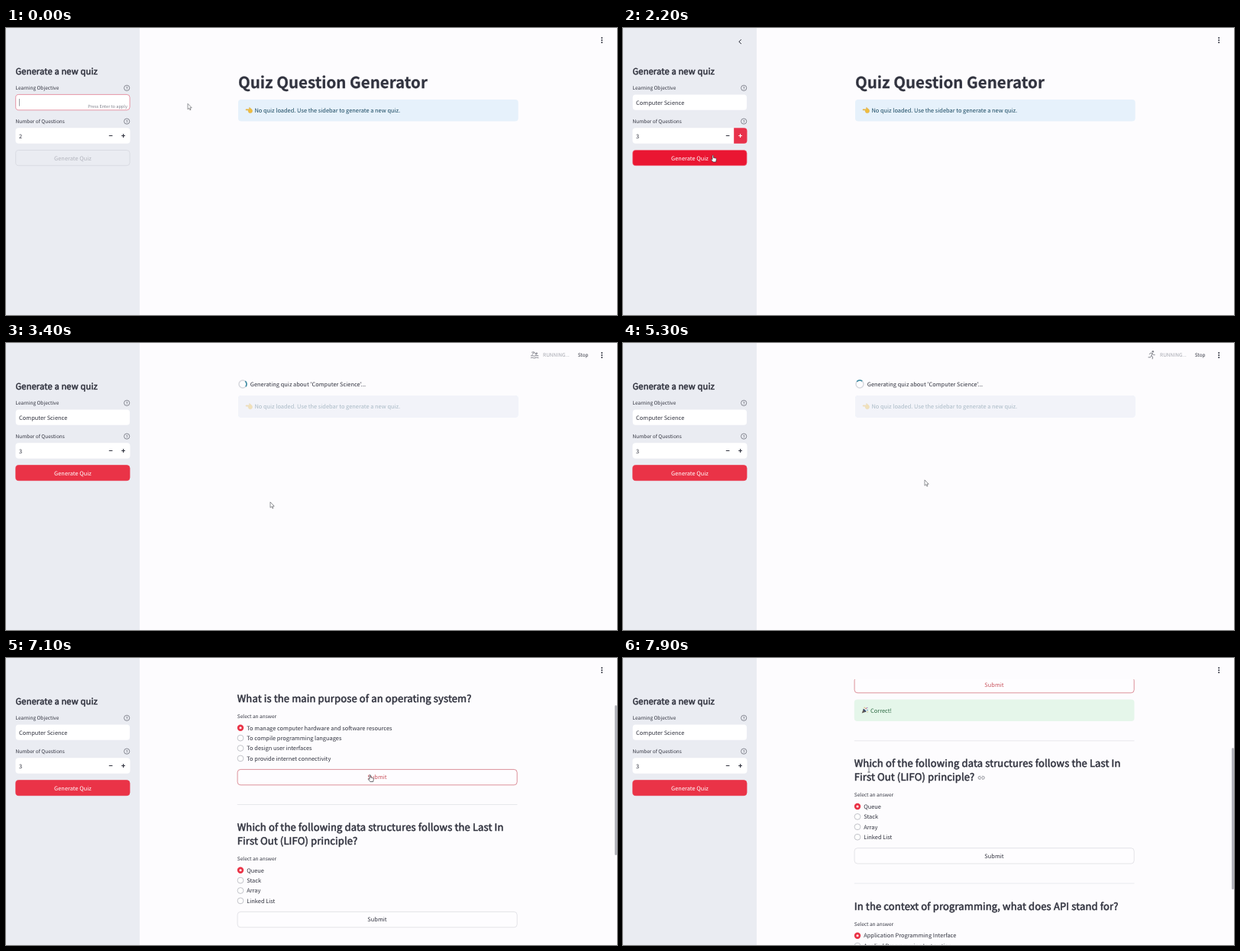
An HTML page that plays this animation: 800x377 px, repeating every 8 s.

```html
<!DOCTYPE html>
<html lang="en">
<head>
<meta charset="utf-8">
<title>Quiz generator</title>
<style>
  html, body { margin: 0; width: 100%; height: 100%; overflow: hidden; background: #fdfcfe; }
  svg { display: block; width: 100vw; height: 100vh; }
  text {
    font-family: "Noto Sans CJK JP", "Noto Sans CJK SC", "Noto Sans CJK", "Noto Sans", sans-serif;
    fill: #31333f; text-rendering: geometricPrecision; white-space: pre;
  }
  .semi { stroke: #31333f; stroke-width: .52px; letter-spacing: .13px; }
  .title { font-weight: 700; stroke: #31333f; stroke-width: .25px; }
  .strong { stroke: #2f6b45; stroke-width: .25px; }
  .line { fill: none; stroke: #31333f; stroke-linecap: round; stroke-linejoin: round; }
  #status .line, #link { stroke: #85878f; }
</style>
</head>
<body>
<script>
const LOOP = 8000, STEP = 100;
const BODY = 7.45, SMALL = 6.52, TINY = 5.59, H2 = 11.17, H3 = 13.03, H1 = 20.5;
const RED = '#ea3347', HOT = '#ea1632', INK = '#31333f', GREEN = '#2f6b45', GREY = '#85878f';
const LEFT = 302.8, WIDTH = 366.7;
const topic = 'Computer Science';

// Markup helpers
const text = (x, y, s, size = BODY, attrs = '') =>
  `<text x="${x}" y="${y}" font-size="${size}" ${attrs}>${s}</text>`;
const box = (x, y, w, h, fill, attrs = '') =>
  `<rect x="${x}" y="${y}" width="${w}" height="${h}" rx="4" fill="${fill}" ${attrs}/>`;
const line = (d, width = 1, attrs = '') =>
  `<path class="line" d="${d}" stroke-width="${width}" ${attrs}/>`;
const dot = (x, y, r, fill, attrs = '') =>
  `<circle cx="${x}" cy="${y}" r="${r}" fill="${fill}" ${attrs}/>`;
const ring = (x, y, r, colour, width) =>
  dot(x, y, r, 'none', `stroke="${colour}" stroke-width="${width}"`);
const group = (id, body) => `<g id="${id}">${body}</g>`;
const rule = y => `<rect x="${LEFT}" y="${y - .3}" width="${WIDTH}" height=".7" fill="#dfe0e6"/>`;
const help = y => ring(158.2, y, 3.6, '#6d6f7a', .8) +
  text(158.2, y + 1.9, '?', 5.2, 'text-anchor="middle"');

const popper = (x, y) => `<g transform="translate(${x} ${y})">
  <path d="M-3.8 3.8L-1.6-2L2 1.6Z" fill="#5f5a55"/>
  <path d="M-1.6-2Q1.2-1 2 1.6L.5 2L-2-.7Z" fill="#3c4a70"/>
  ${dot(1.6, -2.6, .8, '#c8475a')}${dot(3.4, -.4, .7, '#4b76b8')}${dot(-.4, -3.6, .6, '#d2a53c')}
  ${dot(3.3, -3.4, .6, '#8a5bb0')}${dot(3.6, 2, .6, '#d2a53c')}</g>`;

const hand = `<path transform="translate(318.3 108.2)" fill="#f0bd3e" stroke="#c98f22" stroke-width=".3"
  d="M-4.4-1.2Q-4.6-.1-3.6-.1H-.9Q-1.6 1-.9 1.6Q-1 2.5-.2 2.7Q0 3.5 1 3.4H2.5Q4.2 3 4.3.8Q4.3-1.4 2.4-2.2
  L.8-3.7Q0-3.9 0-3L.7-1.5H-3.6Q-4.3-1.6-4.4-1.2Z"/>`;

function submitButton(y, id) {
  return `<g ${id ? `id="${id}"` : ''}>` +
    box(LEFT + .3, y, WIDTH - .6, 20.4, '#fefdff', 'stroke="#d8d9df" stroke-width=".7"') +
    text(486, y + 13, 'Submit', BODY, 'text-anchor="middle"') + '</g>';
}

// One question block, placed below its divider
function question(y, lines, answers, submitId) {
  const low = y + (lines.length - 1) * 17.5;
  const heads = lines.map((s, i) => text(LEFT, y + 34.7 + i * 17.5, s, H3, 'class="semi"'));
  const radios = answers.map((s, i) => {
    const cy = low + 68.7 + i * 13.4;
    const mark = i ? dot(307, cy, 3.9, '#fff', 'stroke="#a9abb3" stroke-width=".7"')
                   : dot(307, cy, 4.2, RED) + dot(307, cy, 1.5, '#fff');
    return mark + text(315.2, cy + 2.8, s);
  });
  return rule(y) + heads.join('') + text(LEFT, low + 56.1, 'Select an answer', SMALL) +
    radios.join('') + submitButton(low + 123.4, submitId);
}

const sidebar = `<rect width="175" height="377" fill="#eaecf2"/>` +
  line('M154.6 15.4L151.8 18L154.6 20.6', 1, 'id="collapse"') +
  text(12.5, 61.4, 'Generate a new quiz', H2, 'class="semi"') +
  text(12.5, 81.3, 'Learning Objective', SMALL) + help(78.8) +
  box(12.7, 87.4, 149.4, 20.4, '#fff', 'id="field"') +
  text(17, 100.6, '', BODY, 'id="typed"') +
  '<rect id="caret" y="93" width=".6" height="9.6" fill="#5a5c66"/>' +
  text(158.8, 105, 'Press Enter to apply', TINY, 'id="hint" text-anchor="end" style="fill:#80828c"') +
  text(12.5, 125.1, 'Number of Questions', SMALL) + help(122.6) +
  box(12.5, 131.2, 150, 20.6, '#fff') + text(17, 144.5, '2', BODY, 'id="count"') +
  '<path id="plusBg" d="M145.2 131.2H158.5Q162.5 131.2 162.5 135.2V147.8Q162.5 151.8 158.5 151.8H145.2Z" fill="#e8314a"/>' +
  line('M135.3 141.5H139', 1.2) + line('M151.7 141.5H155.5M153.6 139.6V143.4', 1.2, 'id="plus"') +
  box(12.7, 160.5, 149.4, 20.2, 'none', 'id="goBg" stroke-width=".6"') +
  text(87.5, 173.5, 'Generate Quiz', BODY, 'id="go" text-anchor="middle"');

const title = text(304, 79.4, 'Quiz Question Generator', H1, 'class="title"');

const intro = group('title', title) + group('notice',
  box(304, 94, 366.7, 28.6, '#e6f1fb') + box(304, 94, 366.7, 28.6, '#f2f3f9', 'id="veil"') +
  group('noticeText', hand + text(325.4, 110.9,
    'No quiz loaded. Use the sidebar to generate a new quiz.', BODY, 'style="fill:#17475f"')));

const spinner = group('spinner',
  ring(310, 54, 5, '#d6d8de', 1.5) +
  '<path id="arc" d="M306.46 50.46A5 5 0 0 1 313.54 50.46" fill="none" stroke="#3c8ba3" stroke-width="1.6"/>' +
  text(319.8, 56.8, `Generating quiz about '${topic}'...`));

const results = group('results', `<g transform="translate(-1.2 0)">${title}</g>` +
  box(LEFT, 94, WIDTH, 28.6, '#e5f6ea') + popper(316.5, 108.3) +
  text(324, 111, `A new quiz was generated based on the learning objective:  <tspan class="strong">${topic}</tspan>`,
    BODY, `style="fill:${GREEN}"`) +
  question(148.5, ['What is the main purpose of an operating system?'],
    ['To manage computer hardware and software resources', 'To compile programming languages',
     'To design user interfaces', 'To provide internet connectivity'], 'submit') +
  group('correct', box(LEFT, 301, WIDTH, 28.6, '#e5f6ea') + popper(316.5, 315.3) +
    text(324, 318, 'Correct!', BODY, `style="fill:${GREEN}"`)) +
  group('rest',
    question(318, ['Which of the following data structures follows the Last In', 'First Out (LIFO) principle?'],
      ['Queue', 'Stack', 'Array', 'Linked List']) +
    question(505.2, ['In the context of programming, what does API stand for?'],
      ['Application Programming Interface', 'Applied Programming Instruction']) +
    line('M468 364.6H467A1.9 1.9 0 0 0 467 368.4H468M470.4 364.6H471.4A1.9 1.9 0 0 1 471.4 368.4H470.4M467.6 366.5H470.8',
      .9, 'id="link"')));

// Sports figures of the running indicator: runner, swimmer, cyclist
const figures = [
  dot(693.8, 11.3, 1.3, GREY) +
    line('M689.2 14.6L691 13L693.2 13.6L691.8 16.6L693.6 18L693.2 20.8M691.8 16.8L690.6 18.8H688M693.2 13.8L694.4 15.6H696.2'),
  dot(694.8, 13.6, 1.2, GREY) +
    line('M688.6 12.2L691.4 11.8L694 15.4M691.4 12.4L689.2 15M687.4 16.8Q688.9 15.8 690.2 16.8T693 16.8T697 16.8M687.4 19.4Q688.9 18.4 690.2 19.4T693 19.4T697 19.4'),
  dot(693.6, 11, 1.2, GREY) + ring(689.4, 18, 2.2, GREY, .9) + ring(695.4, 18, 2.2, GREY, .9) +
    line('M695.4 14.6H693.6L692.4 13L690 14.8L692.4 16.2V18.6')
];
const status = group('status', figures.map((f, i) => group('fig' + i, f)).join('') +
  text(703, 18.2, 'RUNNING...', SMALL, 'style="fill:#a4a6ae"') + text(748.7, 18.2, 'Stop', 6.4));

const pointers = group('arrow',
    '<path d="M0 .4V7.8L1.7 6.3L2.9 8.8L4 8.3L2.9 5.8H5.2Z" fill="#fff" stroke="#4c4d55" stroke-width=".6"/>') +
  group('finger',
    '<path d="M0 .6Q.8-.4 1.5.6V3.4L4.6 4.1Q5.4 4.4 5.3 5.4L4.7 9H.8L-1.6 5.9Q-1.4 4.9-.4 5.4L0 5.8Z" fill="#fff" stroke="#33343c" stroke-width=".7"/>') +
  group('beam', line('M-1.4-4H1.4M0-4V4M-1.4 4H1.4', .6));

document.body.innerHTML = `<svg viewBox="0 0 800 377" preserveAspectRatio="none">
  <clipPath id="page"><rect x="175" y="28" width="625" height="349"/></clipPath>
  <rect width="800" height="377" fill="#fdfcfe"/>
  <g clip-path="url(#page)">${intro}${spinner}${results}</g>
  ${sidebar}${status}
  ${[12.9, 16, 19.1].map(y => dot(780.2, y, 1, INK)).join('')}
  <rect id="thumb" x="797" width="3" rx="1.5" fill="#b4b5bc"/>
  ${group('pointer', pointers)}</svg>`;

const el = {};
document.querySelectorAll('[id]').forEach(n => el[n.id] = n);
const show = (id, on) => el[id].style.display = on ? '' : 'none';
const set = (id, attrs) => { for (const k in attrs) el[id].setAttribute(k, attrs[k]); };

// Tables of [time, value...]
const pointerPath = [
  [0, 238, 99], [300, 238, 99], [900, 158, 115], [1300, 153.5, 138], [1800, 153.5, 138],
  [2200, 117, 167], [2400, 118, 167], [2900, 250, 196], [3400, 346, 208.5], [3600, 372, 194],
  [4400, 393, 182], [5300, 395, 179.5], [5700, 390, 156], [6000, 387, 150], [6400, 396, 150],
  [7000, 476, 153.5], [7400, 476, 153.5], [7900, 322, 146]
];
const scrollPath = [[0, 0], [5500, 0], [6000, 81], [6400, 81], [7000, 125.5], [7400, 125.5], [7900, 246.5]];

function at(path, t) {
  const i = path.findIndex(p => p[0] > t);
  if (i < 0) return path[path.length - 1].slice(1);
  const a = path[i - 1], b = path[i];
  const k = (t - a[0]) / (b[0] - a[0]);
  return a.slice(1).map((v, j) => v + (b[j + 1] - v) * k);
}

function drawSidebar(t, x) {
  const focused = t < 1500, enabled = t >= 1900;
  const plusHot = t >= 1300 && t < 2300, goHot = t >= 2100 && t < 2500;
  const chars = Math.min(topic.length, Math.floor(t / STEP) * 2);
  show('collapse', x < 175);
  el.typed.textContent = topic.slice(0, chars);
  set('field', { stroke: focused ? '#e0637a' : 'none', 'stroke-width': .65 });
  show('hint', focused);
  show('caret', focused && t % 1000 < 900);
  set('caret', { x: 17 + (chars ? el.typed.getComputedTextLength() : 0) });
  el.count.textContent = t < 1700 ? 2 : 3;
  show('plusBg', plusHot);
  el.plus.style.stroke = plusHot ? '#fff' : INK;
  set('goBg', {
    fill: goHot ? HOT : enabled ? RED : 'none',
    stroke: goHot ? '#f0667a' : enabled ? RED : '#cfd1d9'
  });
  el.go.style.fill = enabled ? '#fff' : '#b3b5be';
}

function drawMain(t) {
  const busy = t >= 2900 && t < 5400, done = t >= 5400, correct = t >= 7400;
  const fade = Math.min(1, Math.max(0, (t - 2900) / 400));
  show('title', t < 2900);
  show('notice', !done);
  set('notice', { transform: `translate(0 ${busy ? -24.9 : 0})` });
  set('veil', { opacity: fade });
  set('noticeText', { opacity: 1 - fade * .67 });
  show('spinner', busy);
  set('arc', { transform: `rotate(${(t - 5300) * 1350 / 1900 - 5} 310 54)` });

  show('status', t >= 2600 && !done);
  const pose = Math.floor(Math.max(0, t - 2700) / 400) % figures.length;
  figures.forEach((_, i) => show('fig' + i, i === pose));

  const [scroll] = at(scrollPath, t);
  show('results', done);
  set('results', { transform: `translate(0 ${-scroll})` });
  show('correct', correct);
  set('rest', { transform: `translate(0 ${correct ? 37.3 : 0})` });
  show('link', t >= 7800);
  const [frame, label] = el.submit.children, hot = t >= 6900;
  frame.setAttribute('stroke', hot ? '#cf6470' : '#d8d9df');
  label.style.fill = hot ? '#c9545e' : INK;

  const size = correct ? 186 : 197;
  show('thumb', done);
  set('thumb', { y: Math.max(0, scroll * size / 377 - 3.5), height: size });
}

function draw(t) {
  const [x, y] = at(pointerPath, t);
  const finger = (t >= 1300 && t < 2500) || (t >= 6900 && t < 7500);
  const beam = t >= 7800;
  drawSidebar(t, x);
  drawMain(t);
  set('pointer', { transform: `translate(${x} ${y})` });
  show('finger', finger);
  show('beam', beam);
  show('arrow', !finger && !beam);
}

const start = performance.now();
function tick() {
  const t = (performance.now() - start) % LOOP;
  draw(Math.floor(t / STEP) * STEP);
  requestAnimationFrame(tick);
}
tick();
</script>
</body>
</html>
```
